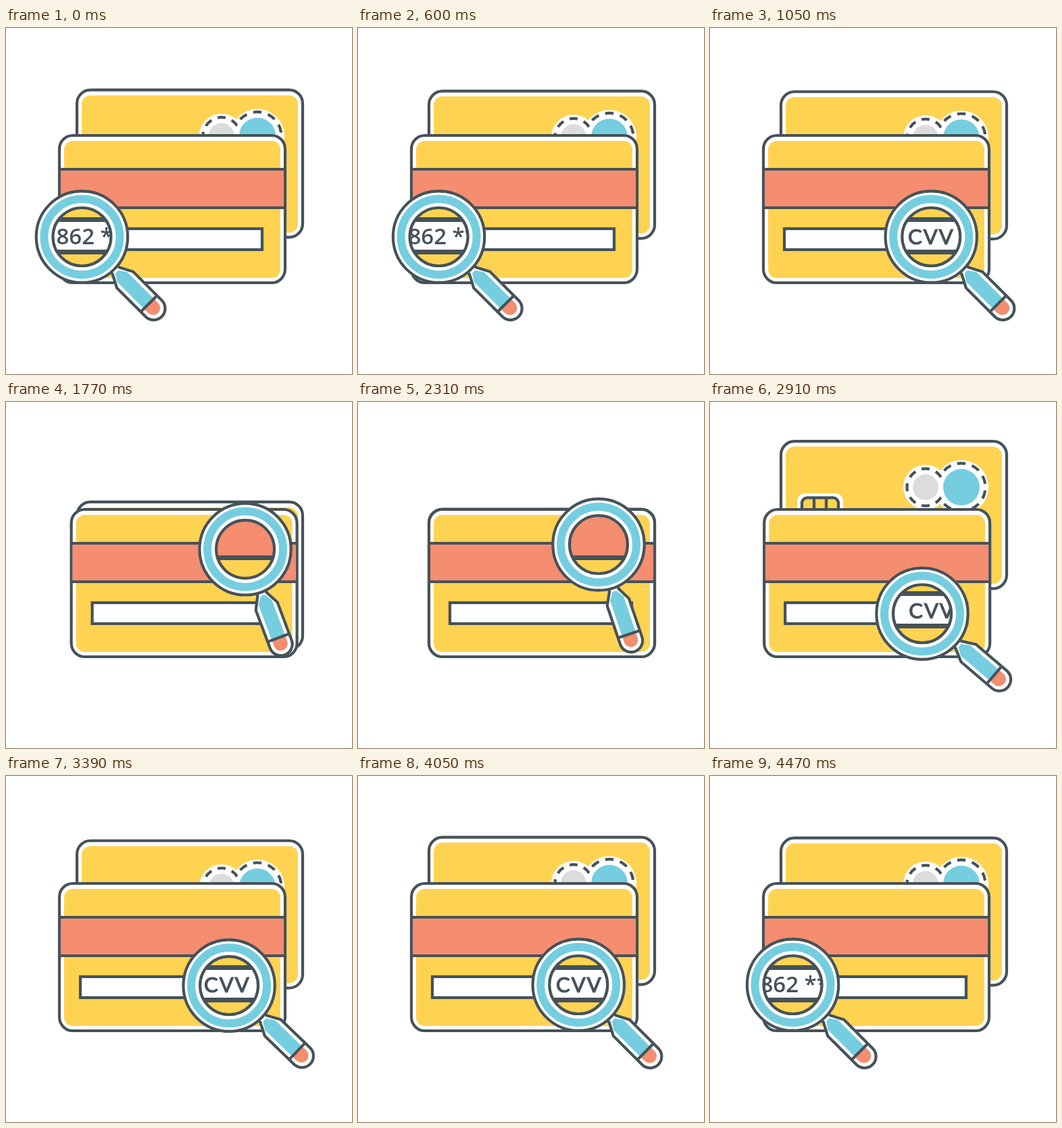
An HTML page that plays this animation: 512x512 px, repeating every 4500 ms.

```html
<!DOCTYPE html>
<html>
<head>
<meta charset="utf-8">
<style>
  html, body { margin: 0; width: 100%; height: 100%; overflow: hidden; background: #fff; }
  svg { display: block; width: 100vw; height: 100vh; }
  .line { stroke: #465259; stroke-width: 4.2; fill: none; }
  .bold { stroke-width: 7; }
  .white { fill: #fff; }
  .yellow { fill: #ffd352; }
  .coral { fill: #f58d70; }
  .blue { fill: #74cee0; }
  text { fill: #465259; }
</style>
</head>
<body>
<svg viewBox="0 0 512 512">
  <defs>
    <g id="card">
      <rect class="line white" width="334" height="218" rx="20"/>
      <rect class="yellow" x="7" y="8" width="320" height="203" rx="13"/>
    </g>
    <clipPath id="glass"><circle id="hole" r="43"/></clipPath>
  </defs>

  <g id="back">
    <use href="#card"/>
    <rect class="white" x="24" y="77" width="68" height="60" rx="12"/>
    <rect class="line yellow" x="31" y="83.5" width="54" height="46" rx="8"/>
    <path class="line" d="M49 83.5v46M67 83.5v46"/>
    <g transform="translate(214 68)">
      <circle class="white" r="33"/>
      <circle class="white" cx="53" r="40"/>
      <circle fill="#dcdcdc" r="19"/>
      <circle class="line" r="27.5" pathLength="80" stroke-dasharray="5.5 4.5" stroke-dashoffset="2.75"/>
      <circle class="white" cx="53" r="33.5"/>
      <circle class="blue" cx="53" r="27"/>
      <path class="line" id="ring" pathLength="272" stroke-dasharray="20 16"/>
    </g>
  </g>

  <g id="front">
    <use href="#card"/>
    <rect class="coral" x="2" y="50" width="330" height="57"/>
    <path class="line" d="M0 50H334M0 107H334"/>
    <rect class="line white" x="31" y="138" width="269" height="31"/>
  </g>

  <g id="handle">
    <path class="line white" d="M62-7H71L90-17H150A17 17 0 0 1 150 17H90L71 7H62Z"/>
    <path class="blue" d="M73-3L84-10.5H139V10.5H84L73 3Z"/>
    <path class="coral" d="M141-10.5H149A10.5 10.5 0 0 1 149 10.5H141Z"/>
    <path class="line" d="M140-17V17"/>
  </g>
  <circle class="white" id="disc" r="68"/>
  <g clip-path="url(#glass)">
    <rect class="yellow" width="512" height="512"/>
    <rect class="coral" width="512" height="230"/>
    <path class="line bold" d="M0 230.5H512"/>
    <rect class="line bold white" x="-20" y="283.5" width="560" height="48"/>
    <g id="labels">
      <text x="74.5" y="320" font-family="'Open Sans', sans-serif" font-size="33" font-weight="600">862 ***</text>
      <text x="293" y="319.5" font-family="Lato, sans-serif" font-size="31" letter-spacing="2" stroke="#465259" stroke-width="1.2">CVV</text>
    </g>
  </g>
  <g id="rings">
    <circle class="line" r="67.7"/>
    <circle r="56" fill="none" stroke="#74cee0" stroke-width="12"/>
    <circle class="line" r="43"/>
  </g>
</svg>
<script>
const LOOP = 4500, GLIDE = 750, RELEASE = 2330;
const $ = id => document.getElementById(id);
const mix = (a, b, p) => a + (b - a) * p;

// Cubic ease in and out
function glide(t, start) {
  const u = Math.min(1, Math.max(0, (t - start) / GLIDE));
  return u < 0.5 ? 4 * u ** 3 : 1 - 4 * (1 - u) ** 3;
}

// Stack the parts together, then let them swing apart and settle
function stacked(t, start, width, halfWave) {
  const s = t - RELEASE;
  return s < 0 ? glide(t, start) : Math.exp(-((s / width) ** 2)) * Math.cos(Math.PI * s / halfWave);
}

const move = (id, x, y, angle = 0) =>
  $(id).setAttribute('transform', `translate(${x} ${y}) rotate(${angle})`);

function draw() {
  const t = performance.now() % LOOP;
  const drift = 92.5 + 2 * Math.sin(2 * Math.PI * t / LOOP - 0.42);
  const back = mix(drift, 158.5, stacked(t, 1280, 700, 600));
  const front = mix(79, 105, stacked(t, 1345, 330, Infinity));

  // The lens visits the number on the left across the loop's seam
  const scan = glide(t, 3960) + glide(t + LOOP, 3960) - glide(t, 370);
  const x = mix(328, 356, stacked(t, 1215, 700, 600)) - 236 * scan;
  const y = mix(309, 211, stacked(t, 1215, 500, 1050));
  const angle = mix(45, 71.3, stacked(t, 1215, 600, 900));

  move('back', 105, back);
  move('front', front, 159);
  move('labels', front - 79, 0);
  move('handle', x, y, angle);
  for (const id of ['disc', 'hole', 'rings']) move(id, x, y);
  requestAnimationFrame(draw);
}

const onRing = deg => {
  const a = deg * Math.PI / 180;
  return `${53 + 35.5 * Math.cos(a)} ${35.5 * Math.sin(a)}`;
};
$('ring').setAttribute('d', `M${onRing(224)}A35.5 35.5 0 1 1 ${onRing(136)}`);
draw();
</script>
</body>
</html>
```
